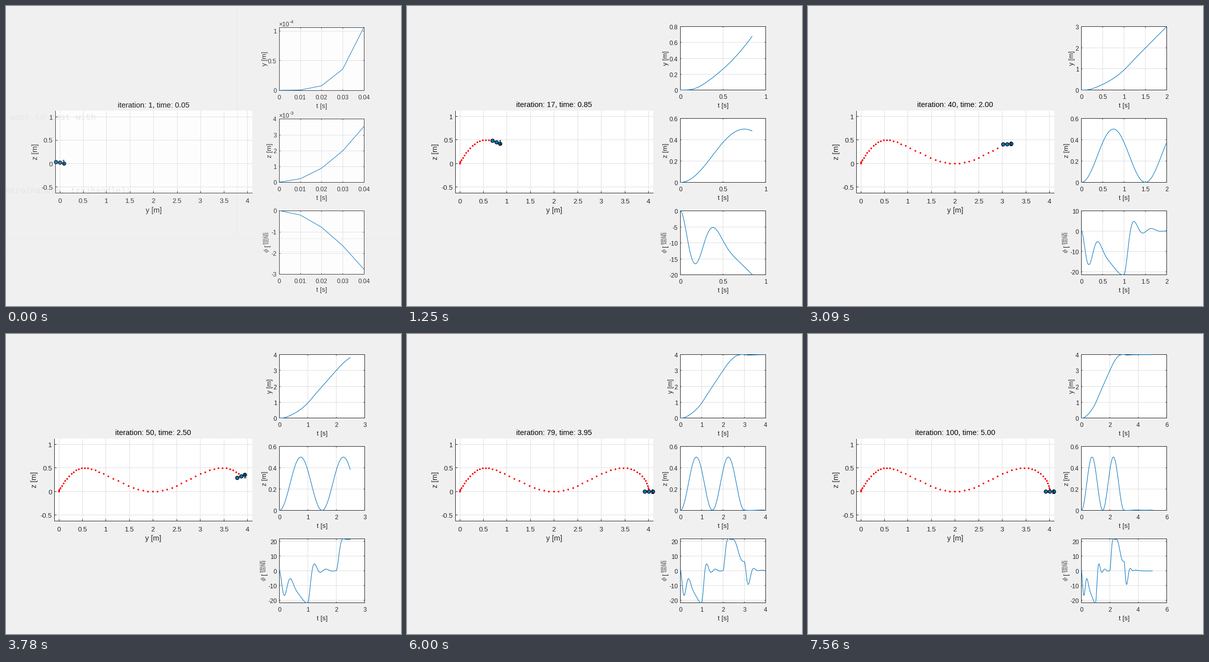
These frames come from a looping animation (778x591 px, 7720 ms). A matplotlib script:

```python
import math
import numpy as np
import matplotlib.pyplot as plt
from matplotlib.animation import FuncAnimation
from matplotlib.collections import LineCollection
from matplotlib.patches import Rectangle

W, H = 778, 591
LOOP, STEP = 7720, 20
PT = 0.72                      # points per pixel at 100 dpi
NUDGE = .01                    # keeps half-pixel lines on their own pixel row
BG, INK, GRID, BLUE = "#f0f0f0", "#262626", "#dfdfdf", "#0072bd"

fig = plt.figure(figsize=(W / 100, H / 100), dpi=100, facecolor=BG)
ax = fig.add_axes([0, 0, 1, 1])
ax.axis("off")


# Flight: a PD-controlled planar quadrotor follows a planned path
GRAVITY, OMEGA = 9.81, 2 * math.pi / 1.5
KP, KV = 16, 6.3               # position loop
KP_TILT, KV_TILT = 360, 20     # attitude loop


def plan(t):
    """Planned y, speed and acceleration: speed up, cruise, brake, hover."""
    if t < 1:
        return t * t, 2 * t, 2
    if t < 2:
        return 2 * t - 1, 2, 0
    if t < 3:
        return 4 - (3 - t) ** 2, 2 * (3 - t), -2
    return 4, 0, 0


def fly(duration=5.1, dt=.0005, every=20):
    """Return y and tilt in degrees, one sample per 0.01 s."""
    y = vy = tilt = rate = 0.0
    samples = []
    for i in range(round(duration / dt)):
        if i % every == 0:
            samples.append((y, math.degrees(tilt)))
        t = i * dt
        want_y, want_v, want_a = plan(t)
        command = want_a + KV * (want_v - vy) + KP * (want_y - y)
        lift = GRAVITY + (.25 * OMEGA ** 2 * math.cos(OMEGA * t) if t < 3 else 0)
        spin = KP_TILT * (-command / GRAVITY - tilt) - KV_TILT * rate
        rate += spin * dt
        tilt += rate * dt
        vy -= lift * math.tan(tilt) * dt
        y += vy * dt
    return np.array(samples).T


Y, PHI = fly()
T = np.arange(len(Y)) * .01
Z = np.where(T < 3, .25 * (1 - np.cos(OMEGA * T)),
             -.003 * np.sin(5.5 * (T - 3)) * np.exp(1.2 * (3 - T)))


def iteration_at(ms):
    return int(np.interp(ms, [0, 1250, 3090, 3780, 7560], [1, 17, 40, 50, 100]) + 1e-9)


live = []


def text(x, y, s, size, ha="center", rot=0, color=INK, font="Liberation Sans", **kw):
    """Text whose digits are centred on (x, y) across the baseline."""
    if rot:
        x += .36 * size
    else:
        y += .36 * size
    return ax.text(x, y, s, fontsize=size * PT, ha=ha, va="baseline", rotation=rot,
                   rotation_mode="anchor", color=color, family=font, **kw)


def lines(segments, color, z):
    return ax.add_collection(LineCollection(segments, colors=color, linewidths=PT,
                                            zorder=z), autolim=False)


def box(left, top, right, bottom, z, **style):
    return ax.add_patch(Rectangle((left, top), right - left, bottom - top,
                                  zorder=z, **style))


def nice_axis(lo, hi, most):
    """Limits and ticks; a limit stays tight if rounding wastes too much."""
    span = hi - lo
    unit = 10.0 ** math.floor(math.log10(span))
    step = next(k * unit for k in (.1, .2, .5, 1, 2, 5, 10) if span / (k * unit) <= most)
    a = math.floor(lo / step + 1e-9) * step
    b = math.ceil(hi / step - 1e-9) * step
    a = lo if lo - a > .67 * step else a
    b = hi if b - hi > .67 * step else b
    first, last = math.ceil(a / step - 1e-9), math.floor(b / step + 1e-9)
    return a, b, step * np.arange(first, last + 1)


def label_width(s, size):
    return size * sum({".": .278, "-": .333}.get(c, .556) for c in s)


# Main view
ML, MR, MT, MB = 95.5, 485, 206, 368.5
SCALE, X0, Z0 = 92.9, 104, 310.3


def to_main(y, z):
    return X0 + SCALE * y, Z0 - SCALE * z


def draw_main_frame():
    box(ML, MT, MR, MB, 0, fc="white", ec="none")
    grid, marks = [], [[(ML, MT), (ML, MB)], [(ML, MB), (MR, MB)]]
    for v in np.arange(0, 4.1, .5):
        x = math.floor(to_main(v, 0)[0]) + .5
        grid.append([(x, MT), (x, MB)])
        marks.append([(x, MB), (x, MB - 4)])
        text(x, 384, f"{v:g}", 13.3)
    for v in np.arange(-.5, 1.1, .5):
        z = math.floor(to_main(0, v)[1]) + .5
        grid.append([(ML, z), (MR, z)])
        marks.append([(ML, z), (ML + 4, z)])
        text(90.5, z + 1, f"{v:g}", 13.3, ha="right")
    lines(grid, GRID, 1)
    lines(marks, INK, 2)
    text(290, 402, "y [m]", 14.67)
    text(55, 287, "z [m]", 14.67, rot=90)


draw_main_frame()
title = text(290, 194, "", 14.67, color="black")
trail, = ax.plot([], [], "o", color="red", ms=3.4 * PT, mew=0, zorder=4)
robot, = ax.plot([], [], "o-", color="black", lw=PT, ms=7 * PT, mfc=BLUE,
                 mec="black", mew=1.1 * PT, zorder=5)
tag = text(0, 0, "1", 13.3, ha="left", color="black", zorder=6)

# Side plots: values, label, top, bottom
L, R = 538.5, 706.5
PANELS = [(Y, "y [m]", 40.5, 165.5), (Z, "z [m]", 221.5, 347.5),
          (PHI, None, 403.5, 529.5)]
curves = []
for _, _, top, bottom in PANELS:
    box(L, top, R, bottom, 0, fc="white", ec="none")
    box(L, top, R, bottom, 2, fc="none", ec=INK, lw=PT)
    curves += ax.plot([], [], color=BLUE, lw=1.05 * PT, zorder=3)
    text((L + R) / 2, bottom + 30, "t [s]", 13.2)


def draw_panel(curve, count, values, label, top, bottom):
    t, v = T[:count], values[:count]
    t0, t1, t_ticks = nice_axis(0, t[-1], 4.1)
    v0, v1, v_ticks = nice_axis(v.min(), v.max(), 4.6)

    def px(a):
        return L + (R - L) * (a - t0) / (t1 - t0)

    def py(a):
        return bottom - (bottom - top) * (a - v0) / (v1 - v0)

    curve.set_data(px(t), py(v))
    grid, marks = [], []
    for a in t_ticks:
        x = math.floor(px(a) + 1e-6) + .5
        grid.append([(x, top), (x, bottom)])
        marks += [[(x, bottom), (x, bottom - 2)], [(x, top), (x, top + 2)]]
        live.append(text(x, bottom + 13.5, f"{a:g}", 12))

    biggest = max(abs(v0), abs(v1))
    power = math.floor(math.log10(biggest) + 1e-9) if biggest < .01 else 0
    names = [f"{a / 10.0 ** power:g}" for a in v_ticks]
    for a, name in zip(v_ticks, names):
        y = math.floor(py(a) + 1e-6) + .5
        grid.append([(L, y), (R, y)])
        marks += [[(L, y), (L + 2, y)], [(R, y), (R - 2, y)]]
        live.append(text(533.5, y + .8, name, 12, ha="right"))
    if power:
        live.append(text(538, top - 6.5, "×10", 12, ha="left"))
        live.append(text(559.5, top - 11.5, str(power), 9.5, ha="left"))
    live.extend([lines(grid, GRID, 1), lines(marks, INK, 2)])

    x, mid = 525.3 - max(label_width(n, 12) for n in names), (top + bottom) / 2
    if label:
        live.append(text(x, mid, label, 13.2, rot=90))
    else:
        live.append(text(x - 1, mid + 16, "ϕ", 11, rot=90, font="DejaVu Serif",
                         style="italic", color="#505050"))
        live.append(text(x - 1, mid + 6.5, "[", 13.2, rot=90))
        live.append(text(x - 2, mid - 9, "锟絔", 13, rot=90, color="#606060",
                         font="Noto Sans CJK JP"))


# Opening moment: the window is still fading in over an editor
veil = [box(-9, -9, W + 9, H + 9, 8, fc=BG, alpha=.12),
        lines([[(-9, 458.5), (W + 9, 458.5)], [(455.5, -9), (455.5, 458.5)]], "#ebebeb", 0),
        lines([[(-9, 484.5), (W + 9, 484.5)]], "#eeeeee", 0),
        text(5, 218, "want to test with", 16.6, ha="left", color="#e6e6e6",
             font="Liberation Mono", zorder=1),
        text(-3, 363, "ntrolhandle, trajhandle);", 16.4, ha="left", color="#e4e4e4",
             font="Liberation Mono", zorder=1)]
shown = None


def show(n):
    global shown
    if n == shown:
        return
    shown = n
    while live:
        live.pop().remove()
    opening = n == 1
    zoom = .995 if opening else 1
    cx, cy = W / 2 + NUDGE, H / 2 + NUDGE
    ax.set_xlim(cx - W / 2 / zoom, cx + W / 2 / zoom)
    ax.set_ylim(cy + H / 2 / zoom, cy - H / 2 / zoom)
    for part in veil:
        part.set_visible(opening)

    title.set_text(f"iteration: {n}, time: {n * .05:.2f}")
    past = 5 * np.arange(1, n + 1)
    trail.set_data(*to_main(Y[past], Z[past]))
    now = 5 * (n + 1)
    x, z = to_main(Y[now], Z[now])
    tilt = math.radians(PHI[now])
    arm = np.array([-8, 0, 8])
    robot.set_data(x + arm * math.cos(tilt), z - arm * math.sin(tilt))
    tag.set_position((x + 4, z - .5 + .36 * 13.3))

    for curve, panel in zip(curves, PANELS):
        draw_panel(curve, 5 * n, *panel)


def update(frame):
    show(iteration_at((frame + .5) * STEP))
    return []


anim = FuncAnimation(fig, update, frames=LOOP // STEP, interval=STEP,
                     init_func=lambda: update(0), repeat=True, repeat_delay=0,
                     blit=False)
plt.show()
```
